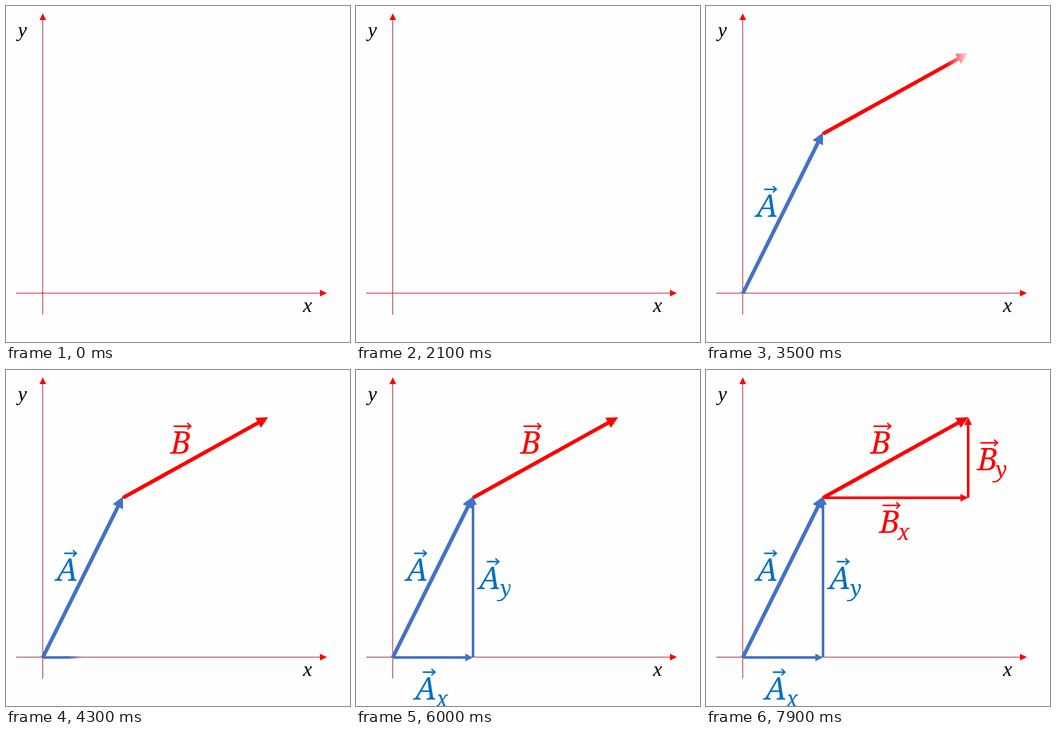
An HTML page that plays this animation: 538x526 px, repeating every 8000 ms.

```html
<!DOCTYPE html>
<html lang="en">
<head>
<meta charset="utf-8">
<title>Vector components</title>
<style>
  html, body { margin: 0; width: 100%; height: 100%; overflow: hidden; background: #fefefe; }
  svg { display: block; width: 538px; height: 526px; }
  .axis { font: italic 32px "Liberation Serif", "Times New Roman", serif; }
  .name { font: italic 49px "Noto Serif", Cambria, serif; font-stretch: semi-condensed; text-anchor: middle; }
  .sub { font-size: 34px; }
</style>
</head>
<body>
<svg id="stage" viewBox="0 0 538 526">
  <defs id="defs"></defs>
  <path d="M57.5 483V20M16 449.5H493" stroke="#a01c24" fill="none"/>
  <path d="M57.5 11.5l5.2 10.5h-10.4zM502 449.5l-11 5.2v-10.4z" fill="#f00"/>
  <text class="axis" x="18.5" y="48">y</text>
  <text class="axis" x="464.5" y="479">x</text>
</svg>
<script>
const LOOP = 8000, STEP = 100, WIPE = 500, SOFTNESS = 0.17;
const BLUE = '#4472c4', INK = '#0070c0', RED = '#ff0000';
const stage = document.getElementById('stage');
const defs = document.getElementById('defs');
const wipes = [];

function add(parent, tag, attrs, text) {
  const el = document.createElementNS('http://www.w3.org/2000/svg', tag);
  for (const key in attrs) el.setAttribute(key, attrs[key]);
  if (text) el.textContent = text;
  parent.appendChild(el);
  return el;
}

// A group revealed by a soft edge moving along one axis from a to b.
function wiped(start, axis, a, b) {
  const id = 'w' + wipes.length;
  const grad = add(defs, 'linearGradient', {
    id: id + 'g', gradientUnits: 'userSpaceOnUse', x1: 0, y1: 0, x2: 0, y2: 0
  });
  add(grad, 'stop', { offset: 0, 'stop-color': '#fff' });
  add(grad, 'stop', { offset: 1, 'stop-color': '#fff', 'stop-opacity': 0 });
  const box = { x: 0, y: 0, width: 538, height: 526 };
  const mask = add(defs, 'mask', { id, maskUnits: 'userSpaceOnUse', ...box });
  add(mask, 'rect', { ...box, fill: `url(#${id}g)` });
  const group = add(stage, 'g', { mask: `url(#${id})` });
  wipes.push({ start, axis, a, b, grad, group });
  return group;
}

function vector(start, axis, x1, y1, x2, y2, width, color) {
  const g = axis === 'x' ? wiped(start, 'x', x1, x2) : wiped(start, 'y', y1, y2);
  const len = Math.hypot(x2 - x1, y2 - y1), head = width * 3;
  const angle = Math.atan2(y2 - y1, x2 - x1) * 180 / Math.PI;
  const arrow = add(g, 'g', { transform: `translate(${x1} ${y1}) rotate(${angle})` });
  add(arrow, 'path', { d: `M0 0H${len - head + 1}`, stroke: color, 'stroke-width': width });
  add(arrow, 'path', { d: `M${len} 0l${-head} ${head / 2}v${-head}z`, fill: color });
}

function label(start, cx, base, letter, sub) {
  const isA = letter === 'A', color = isA ? INK : RED;
  const g = wiped(start, 'x', cx - 28, cx + (sub ? 52 : 28));
  add(g, 'text', { class: 'name', x: cx + (isA ? 1.5 : 0), y: base, fill: color }, letter);
  if (sub) {
    add(g, 'text', { class: 'name sub', x: cx + (isA ? 27 : 22), y: base + 10.5, fill: color }, sub);
  }
  const left = cx + (isA ? -3 : -11), right = cx + 16.5, y = base - 43;
  add(g, 'path', {
    d: `M${left} ${y}H${right - 1}M${right - 6} ${y - 5}l5.5 5l-5.5 5`,
    fill: 'none', stroke: color, 'stroke-width': 2.3
  });
}

vector(2100, 'y', 57.5, 450, 183, 198, 6, BLUE);
label(2580, 94, 330, 'A');
vector(3065, 'x', 183, 200, 410, 74, 6, RED);
label(3580, 273, 131, 'B');
vector(4090, 'x', 57.5, 450, 183, 450, 4, BLUE);
label(4655, 107.5, 516, 'A', 'x');
vector(5130, 'y', 183, 450, 183, 199, 4, BLUE);
label(5620, 207.5, 343, 'A', 'y');
vector(6110, 'x', 183, 200, 410, 200, 4, RED);
label(6580, 287, 255, 'B', 'x');
vector(7050, 'y', 410, 200, 410, 74, 4, RED);
label(7470, 440, 157, 'B', 'y');

function render(time) {
  const t = Math.floor((time % LOOP) / STEP) * STEP;
  for (const { start, axis, a, b, grad, group } of wipes) {
    const p = (t - start) / WIPE;
    group.setAttribute('display', p > 0 ? 'inline' : 'none');
    if (p >= 1) group.removeAttribute('mask');
    else group.setAttribute('mask', `url(#${grad.id.slice(0, -1)})`);
    const soft = (b - a) * SOFTNESS;
    const front = a + (b - a + soft) * Math.min(1, Math.max(0, p));
    grad.setAttribute(axis + 1, front - soft);
    grad.setAttribute(axis + 2, front);
  }
}

const origin = performance.now();
function tick() {
  render(performance.now() - origin);
  requestAnimationFrame(tick);
}
tick();
</script>
</body>
</html>
```
